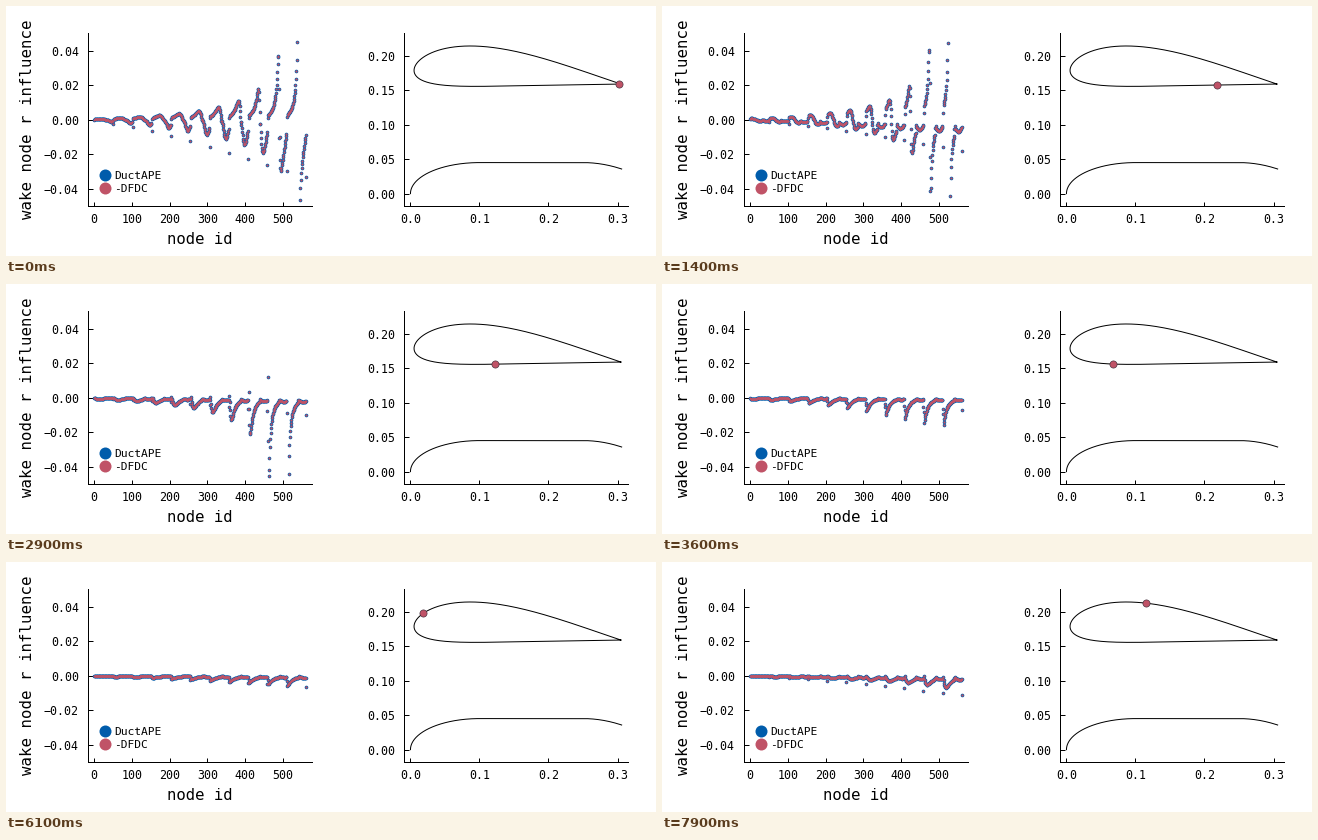
Recreate the animation shown at these times as a matplotlib script. Size 650 by 250 pixels, loop 8000 ms.

```python
import numpy as np
import matplotlib.pyplot as plt
from matplotlib.animation import FuncAnimation
from matplotlib.lines import Line2D

W, H, DPI = 650, 250, 100
FRAMES, STEP = 80, 100
PT = 72 / DPI
BLUE, RED = "#005CAB", "#C05367"
X_LE, CHORD = 0.0052, 0.2997
X_TE, HUB_TE, WAKE_END = X_LE + CHORD, 0.3062, 0.549
SHEETS, AFT, FAR, STRETCH = 11, 30, 19, 1.125

plt.rcParams["font.family"] = "DejaVu Sans Mono"
plt.rcParams["axes.linewidth"] = PT


# The section runs over s from -1 (inner trailing edge) to 1 (outer one).
def duct_x(s):
    return X_LE + CHORD * s ** 2


def duct_s(x):
    return np.sqrt(np.clip((x - X_LE) / CHORD, 0, 1))


def duct_r(s):
    t = s ** 2
    camber = 0.1785 + 0.0499 * t - 0.1106 * t ** 2 + 0.041 * t ** 3
    return camber + s * (1 - t) * (0.086 - 0.033 * t)


def hub_r(x):
    nose = 0.045 * np.sqrt(1 - np.clip(1 - x / 0.1, 0, 1) ** 2)
    return nose - 0.0093 * np.clip((x - 0.25) / 0.056, 0, 1) ** 2


def aft_x(n):
    """Distance ahead of the trailing edge after n panels."""
    return 0.00577 * n + 1.41e-5 * n ** 2


def wake_grid():
    body = X_TE - aft_x(np.arange(AFT, -1, -1))
    growth = np.cumsum(STRETCH ** np.arange(FAR))
    x = np.r_[body, HUB_TE, HUB_TE + (WAKE_END - HUB_TE) * growth / growth[-1]]
    inner, outer = hub_r(x) ** 2, duct_r(-duct_s(x)) ** 2
    r0 = np.linspace(inner[0] ** 0.5, outer[0] ** 0.5, SHEETS)
    frac = (r0 ** 2 - inner[0]) / (outer[0] - inner[0])
    r = np.sqrt(inner + frac[:, None] * (outer - inner))
    gap = np.diff(x)
    weight = (np.r_[0, gap] + np.r_[gap, 0]) / 2
    return x, r, weight


def elliptic(m):
    """Complete elliptic integrals K and E by the arithmetic-geometric mean."""
    a, b = np.ones_like(m), np.sqrt(1 - m)
    total, power = m / 2, 1.0
    for _ in range(8):
        a, b, c = (a + b) / 2, np.sqrt(a * b), (a - b) / 2
        total = total + power * c ** 2
        power *= 2
    k = np.pi / (2 * a)
    return k, k * (1 - total)


XW, RW, WEIGHT = wake_grid()
NODE = np.arange(1, RW.size + 1)


def influence(x, r):
    """Radial velocity at (x, r) from each vortex ring of the wake."""
    dx = x - XW
    far = dx ** 2 + (r + RW) ** 2
    near = dx ** 2 + (r - RW) ** 2 + 1e-12
    m = np.minimum(4 * r * RW / far, 1 - 1e-12)
    k, e = elliptic(m)
    ring = dx / (2 * np.pi * r * np.sqrt(far)) * ((r**2 + RW**2 + dx**2) / near * e - k)
    v = ring * WEIGHT
    # The last node also carries the semi-infinite sheet.
    q, k, e, rw = np.sqrt(m[:, -1]), k[:, -1], e[:, -1], RW[:, -1]
    v[:, -1] -= np.sqrt(rw / r) / (2 * np.pi) * ((2 / q - q) * k - 2 * e / q)
    return v.ravel()


def probe(i):
    """Section parameter of the control point: panel midpoints, then the nose."""
    if i < AFT:
        return -duct_s(X_TE - (aft_x(i) + aft_x(i + 1)) / 2)
    u = i - 53
    return 0.0267 * u - 5e-6 * max(u, 0) ** 3


fig = plt.figure(figsize=(W / DPI, H / DPI), dpi=DPI, facecolor="white")


def make_axes(left, right, xlim, ylim, xticks, yticks, xfmt, yfmt):
    top, bottom = 27.4, 200.2
    ax = fig.add_axes([left / W, 1 - bottom / H, (right - left) / W, (bottom - top) / H])
    ax.set(xlim=xlim, ylim=ylim, facecolor="none")
    ax.set_xticks(xticks, [format(t, xfmt) for t in xticks])
    ax.set_yticks(yticks, [format(t, yfmt).replace("-", "\u2212") for t in yticks])
    ax.spines[["top", "right"]].set_visible(False)
    ax.tick_params(direction="in", length=4.5 * PT, width=PT, labelsize=11.6 * PT)
    ax.tick_params(axis="x", pad=7.2 * PT)
    ax.tick_params(axis="y", pad=9.2 * PT)
    return ax


def label(x, y, text, size, **kw):
    fig.text(x / W, 1 - y / H, text, fontsize=size * PT, **kw)


left = make_axes(82, 306.4, (-15.8, 577.8), (-0.05, 0.05), np.arange(0, 501, 100),
                 np.linspace(-0.04, 0.04, 5), "d", ".2f")
right = make_axes(398.1, 622, (-0.0092, 0.3152), (-0.0182, 0.2322),
                  np.linspace(0, 0.3, 4), np.linspace(0, 0.2, 5), ".1f", ".2f")

label(194.2, 233, "node id", 15.6, ha="center", va="center")
label(22, 113, "wake node r influence", 15.7, ha="center", va="center", rotation=90)
for y, color, name in [(168.8, BLUE, "DuctAPE"), (181.8, RED, "-DFDC")]:
    fig.add_artist(Line2D([99.2 / W], [1 - y / H], marker="o", ms=12 * PT,
                          color=color, mew=0, ls="none"))
    label(108.2, y, name, 11.3, va="center_baseline")

s = np.linspace(-1, 1, 400)
right.plot(duct_x(s), duct_r(s), color="black", lw=PT)
xh = 0.306 * np.linspace(0, 1, 300) ** 2
right.plot(xh, hub_r(xh), color="black", lw=PT)

outer_dots, = left.plot([], [], "o", color=BLUE, ms=3.6 * PT, mew=0)
inner_dots, = left.plot([], [], "o", color=RED, ms=2.2 * PT, mew=0)
point, = right.plot([], [], "o", mfc=RED, mec="#3A2A38", mew=0.6 * PT, ms=7.2 * PT, zorder=5)


def draw(i):
    s = probe(i)
    x, r = duct_x(s), duct_r(s)
    v = influence(x, r)
    v[np.abs(v) > 0.05] = np.nan
    outer_dots.set_data(NODE, v)
    inner_dots.set_data(NODE, v)
    point.set_data([x], [r])
    return outer_dots, inner_dots, point


anim = FuncAnimation(fig, draw, frames=FRAMES, interval=STEP, repeat=True, repeat_delay=0)
plt.show()
```
